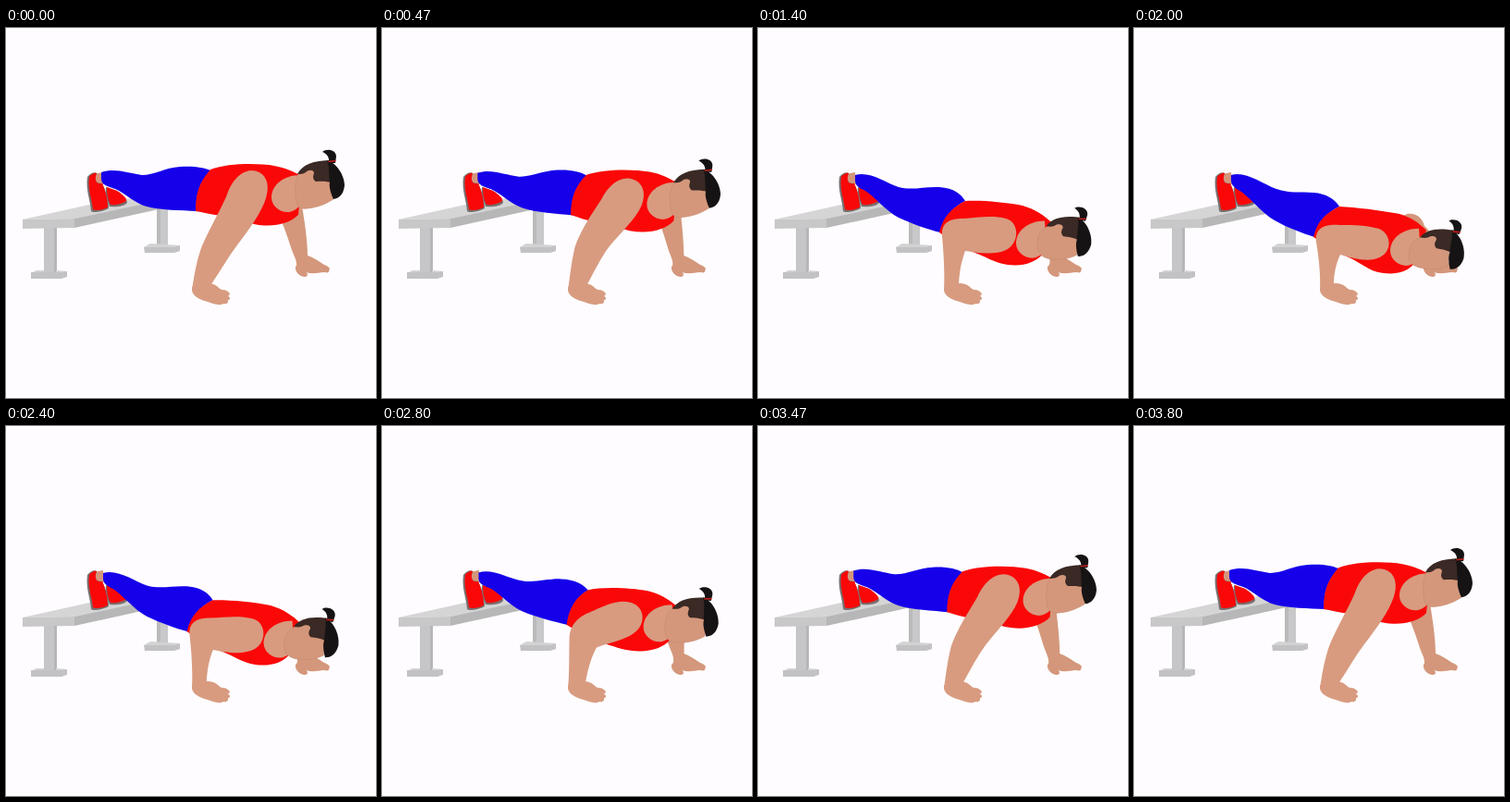
Write an HTML page that moves like this. It is 400 px wide and 400 px high and loops after 3870 ms.

```html
<!DOCTYPE html>
<html lang="en">
<head>
<meta charset="utf-8">
<title>Decline push-up</title>
<style>
  html, body { margin: 0; width: 100%; height: 100%; overflow: hidden; background: #fefcfe; }
  svg { display: block; width: 100vw; height: 100vh; }
</style>
</head>
<body>
<svg viewBox="0 0 400 400">
  <g id="bench">
    <path fill="#bababb" d="M163 188H168V237H163Z"/>
    <path fill="#c8c7c9" d="M167 188H175V237H167Z"/>
    <path fill="#d3d2d3" d="M149 237L156 233L188 235L182 238Z"/>
    <path fill="#c2c1c3" d="M149 237L182 237L188 235V241L182 243H150Z"/>
    <path fill="#d6d5d6" d="M18 207L90 191L135 184L165 184V188L74 206Z"/>
    <path fill="#b8b7b8" d="M74 206L165 187V196L74 216Z"/>
    <path fill="#c9c8c9" d="M18 207L74 206V216L18 217Z"/>
    <path fill="#c6c5c7" d="M41 216H53V264H41Z"/>
    <path fill="#b6b5b7" d="M52 216H55V264H52Z"/>
    <path fill="#d3d2d3" d="M27 265L33 262L41 262V264H54V262L66 263L60 266Z"/>
    <path fill="#c2c1c3" d="M27 264H60L66 263V269L60 271H27Z"/>
  </g>
  <path fill="#77706f" d="M108 172L120 176C126 180 131 185 131 189C128 193 118 194 112 193C109 186 107 180 108 172Z"/>
  <path fill="#fa0808" d="M109 172L120 176C126 180 131 184 130 187C126 190 118 192 113 191C110 186 109 180 109 172Z"/>
  <path id="farArm" fill="#d4977b"/>
  <path fill="#d4977b" d="M313 258C312 264 318 269 323 269C327 269 326 266 325 264C332 267 338 264 344 264C348 265 350 264 349 262C352 261 348 257 344 256C338 252 332 248 326 246Z"/>
  <path fill="#d4977b" d="M94 158L105 156L106 169C100 169 96 166 94 158Z"/>
  <path fill="#77706f" d="M88 161C91 157 96 155 98 157C95 165 98 168 104 168C108 176 111 188 111 195C104 199 94 200 92 198C91 185 86 175 88 161Z"/>
  <path fill="#fa0808" d="M90 161C92 158 96 156 98 157C95 165 98 169 104 168C108 176 110 187 110 194C104 197 97 198 94 196C93 185 88 175 90 161Z"/>
  <path id="pants" fill="#1600ea"/>
  <path id="shirt" fill="#fa0808"/>
  <path id="neck" fill="#d89b80" d="M318 159C300 159 287 170 287 183C287 193 297 200 306 199C312 198 316 194 320 190Z"/>
  <path id="face" fill="#d4977b" stroke="#c68a70" stroke-width=".6"/>
  <g id="hair">
    <path fill="#3a2925" d="M315 158C320 148 332 143 352 143L353 168C346 165 340 166 335 166C331 163 332 160 333 157C333 153 327 153 324 156C321 158 318 158 315 158Z"/>
    <path fill="#161314" d="M347 143C358 146 366 160 366 170C365 180 360 184 354 185C351 178 349 172 350 167C349 160 350 150 347 143Z"/>
    <path fill="#161314" d="M342 134C346 130 357 131 357 139L356 146H349C350 140 347 136 342 134Z"/>
    <path fill="none" stroke="#c4201c" stroke-width="1.6" d="M348.5 144.5L356.5 143.5"/>
  </g>
  <path id="arm" fill="#d89b80"/>
  <path fill="#d89b80" d="M201 280L217 276C229 276 229 282 234 283C238 283 240 285 241 286C243 288 241 290 239 289C243 291 243 294 240 294C241 297 238 299 235 298C232 300 228 299 224 298C216 295 203 293 201 284Z"/>
</svg>
<script>
const LOOP = 3870, STEPS = 58;
const DEPTHS = [0, 0.42, 0.823, 1];

// Four poses of each moving part, from arms straight to fully lowered
const shapes = {
  farArm: [
    "M313 260C316 254 312 248 309 240C305 228 302 218 296 205C304 200 312 194 320 192C322 205 326 228 326 246L330 250Z",
    "M313 260C317 254 314 248 312 242C310 234 308 225 305 210C312 208 320 206 328 205C328 220 327 236 327 247L330 250Z",
    "M313 260C317 254 316 248 312 242C308 234 296 215 300 210C302 204 314 206 316 212C327 225 326 238 326 247L330 250Z",
    "M313 260C316 254 312 248 308 240C300 228 290 215 289 206C292 198 310 198 314 214C326 225 326 238 326 247L330 250Z"
  ],
  pants: [
    "M103 156C118 151 132 157 147 159C160 159 172 151 188 150C204 149 214 151 221 154C208 168 205 182 206 198C190 197 165 197 152 193C140 190 128 178 118 174C110 171 103 170 103 163Z",
    "M104 158C118 153 135 163 150 164C164 166 176 161 192 161C206 161 216 165 222 171C208 180 203 195 203 211C190 208 168 204 153 198C140 193 128 180 118 175C109 172 104 170 104 164Z",
    "M105 159C120 154 138 167 152 172C167 176 180 171 196 172C212 173 220 180 224 187C210 194 200 206 197 221C184 218 165 211 152 205C138 198 126 182 116 176C109 173 105 170 105 165Z",
    "M105 159C120 154 138 168 154 174C168 179 180 177 194 178C208 179 217 185 222 193C206 201 198 211 195 226C182 222 164 215 152 208C138 200 126 184 116 177C109 173 105 170 105 165Z"
  ],
  shirt: [
    "M221 153C240 146 272 146 290 149C302 151 312 156 320 160L316 202C306 212 288 216 268 212C255 208 245 203 235 203C222 202 212 199 205 198C205 180 208 168 221 153Z",
    "M221 171C238 165 270 166 288 169C300 171 310 177 318 183L314 222C306 232 288 237 268 234C255 232 245 229 232 226C222 222 210 215 202 211C203 193 208 180 221 171Z",
    "M224 187C240 186 266 188 286 192C300 196 310 203 318 211L308 244C300 254 286 258 270 256C256 254 246 247 232 242C220 236 206 228 196 221C200 204 210 194 224 187Z",
    "M222 193C240 194 266 197 286 201C300 205 308 211 316 219L302 256C294 264 284 267 268 265C254 263 244 253 232 248C220 242 204 232 194 226C198 209 206 201 222 193Z"
  ],
  face: [
    "M316 158C326 150 340 150 352 160L354 185C348 189 338 194 326 195C320 196 315 194 314 188C312 178 312 166 316 158Z",
    "M314 187C324 180 340 180 352 190L352 215C346 219 336 223 324 224C316 225 310 222 309 216C307 206 308 194 314 187Z",
    "M312 215C322 210 338 212 346 220L345 245C338 249 328 251 318 250C308 249 302 244 302 237C301 228 305 218 312 215Z",
    "M308 227C316 222 332 224 342 232L339 257C332 261 322 262 312 260C302 258 297 254 297 248C297 238 300 231 308 227Z"
  ],
  arm: [
    "M222 277C232 262 240 248 249 236C262 219 276 200 281 184C287 165 278 154 265 154C252 155 243 168 239 180C233 195 217 222 210 241C205 257 203 270 201 284Z",
    "M222 277C226 262 230 249 237 239C246 229 269 223 279 210C288 198 284 183 267 180C254 178 242 188 234 195C220 204 208 213 205 230C203 250 203 270 201 284Z",
    "M217 277C218 264 219 255 224 241C236 243 256 246 268 240C283 233 283 210 268 206C254 202 236 205 222 206C206 206 198 211 199 225C201 245 202 270 201 284Z",
    "M216 277C216 266 218 256 223 245C236 249 254 254 266 248C280 241 278 222 264 217C250 213 236 213 222 213C206 212 195 216 197 232C200 248 202 270 201 284Z"
  ]
};
const moves = {
  neck: ["translate(0 0)", "translate(-2 24)", "translate(-8 49.5)", "translate(-10 58)"],
  hair: [
    "translate(0 0) rotate(0 340 170)",
    "translate(0 29.5) rotate(2 340 170)",
    "translate(-5.5 60) rotate(9 340 170)",
    "translate(-9 73.5) rotate(12 340 170)"
  ]
};

const NUM = /-?\d+(?:\.\d+)?/g;
const byId = id => document.getElementById(id);

// Blend two strings that differ only in their numbers
function blend(a, b, k) {
  const to = b.match(NUM);
  let i = 0;
  return a.replace(NUM, n => (+n + (to[i++] - n) * k).toFixed(2));
}

// Steps at 15 per second, rounded to 10 ms
function stepAt(t) {
  const n = Math.floor((t + 5) * STEPS / LOOP);
  return Math.round(n * 20 / 3) * 10 > t ? n - 1 : n;
}

function draw(step) {
  const depth = (1 - Math.cos(2 * Math.PI * step / STEPS)) / 2;
  const i = depth < DEPTHS[1] ? 0 : depth < DEPTHS[2] ? 1 : 2;
  const k = (depth - DEPTHS[i]) / (DEPTHS[i + 1] - DEPTHS[i]);
  const apply = (set, attr) => {
    for (const id in set) byId(id).setAttribute(attr, blend(set[id][i], set[id][i + 1], k));
  };
  apply(shapes, "d");
  apply(moves, "transform");
}

function tick() {
  draw(stepAt(performance.now() % LOOP));
  requestAnimationFrame(tick);
}
tick();
</script>
</body>
</html>
```
